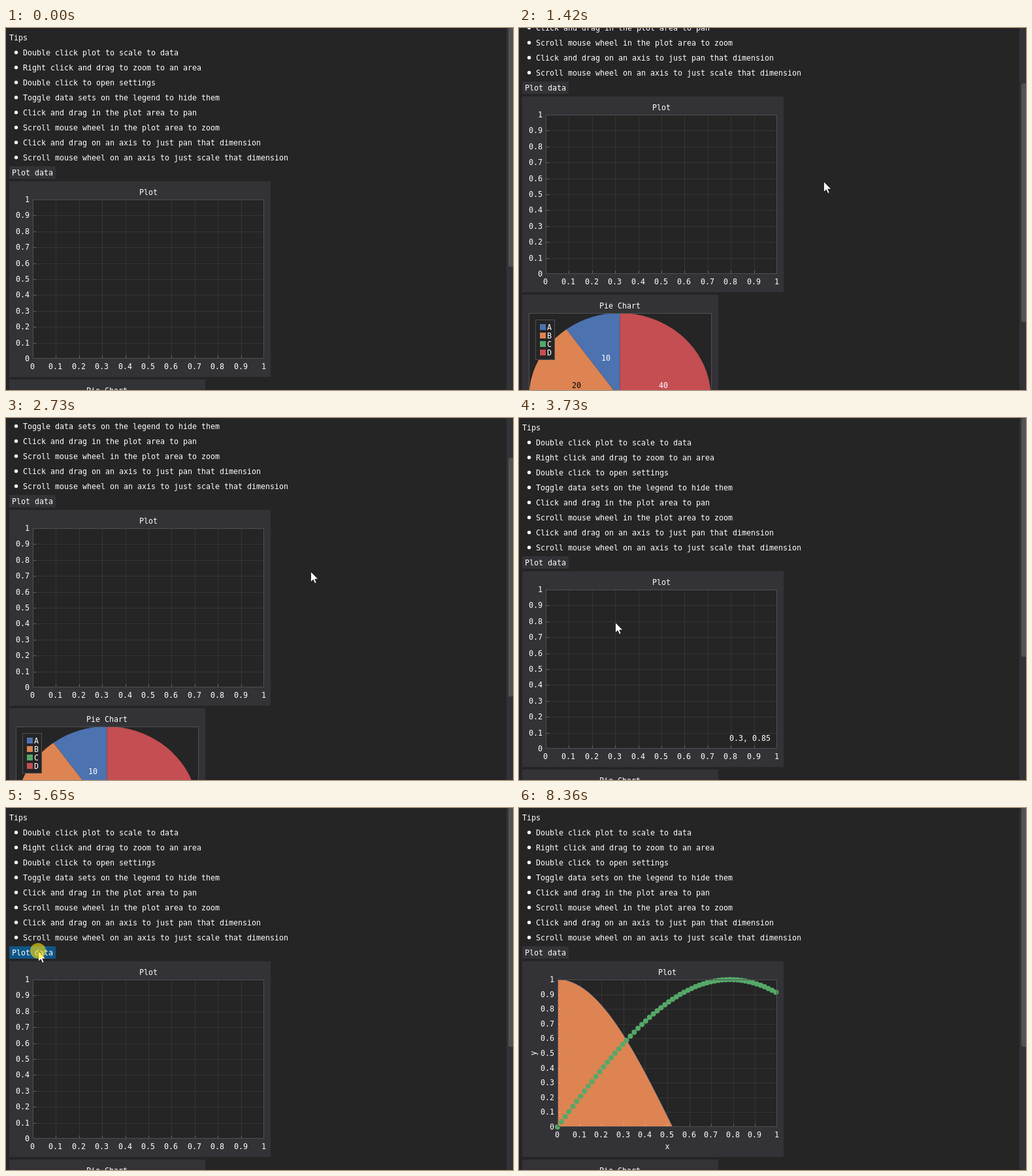
Recreate the animation shown at these times as an HTML page. Size 776x555 px, loop 9270 ms.

```html
<!DOCTYPE html>
<html lang="en">
<head>
<meta charset="utf-8">
<title>Plot demo</title>
<style>
  html, body { margin: 0; width: 100%; height: 100%; overflow: hidden; background: #252526; }
  svg { display: block; width: 776px; height: 555px; }
  text { font: 11.63px "DejaVu Sans Mono", monospace; fill: #fff; white-space: pre; }
  rect { shape-rendering: crispEdges; }
  .panel { fill: #333337; }
  .area { fill: #252526; }
  .grid { fill: #fff; fill-opacity: .065; }
  .tick { fill: #fff; fill-opacity: .25; }
  .frame { fill: none; stroke: #505052; }
  .grab { fill: #525255; shape-rendering: auto; }
</style>
</head>
<body>
<svg id="stage" viewBox="0 0 776 555"></svg>
<script>
const LOOP = 9270;
const BLUE = '#4c72b0', ORANGE = '#dd8452', GREEN = '#55a868', RED = '#c44e52';
const stage = document.getElementById('stage');

function add(parent, tag, attrs) {
  const el = document.createElementNS('http://www.w3.org/2000/svg', tag);
  for (const k in attrs) el.setAttribute(k, attrs[k]);
  return parent.appendChild(el);
}
const box = (p, x, y, width, height, cls) => add(p, 'rect', { x, y, width, height, class: cls });
function label(p, str, x, mid, anchor = 'start', fill) {
  const el = add(p, 'text', { x, y: mid + 4, 'text-anchor': anchor });
  if (fill) el.style.fill = fill;
  el.textContent = str;
  return el;
}
// One pixel wide border just inside the given box
const frame = (p, x, y, w, h) => box(p, x + .5, y + .5, w - 1, h - 1, 'frame');

// Page content
const page = add(stage, 'g', {});
label(page, 'Tips', 5, 15);
[
  'Double click plot to scale to data',
  'Right click and drag to zoom to an area',
  'Double click to open settings',
  'Toggle data sets on the legend to hide them',
  'Click and drag in the plot area to pan',
  'Scroll mouse wheel in the plot area to zoom',
  'Click and drag on an axis to just pan that dimension',
  'Scroll mouse wheel on an axis to just scale that dimension'
].forEach((tip, i) => {
  const y = 38 + 23 * i;
  add(page, 'circle', { cx: 15.5, cy: y - .5, r: 2.7, fill: '#fff' });
  label(page, tip, 26, y);
});
const button = box(page, 5, 212, 71, 19, 'panel');
label(page, 'Plot data', 9, 222);
box(page, 5, 235, 400, 300, 'panel');

function makePlot({ x, y, w, h }, drawData) {
  const g = add(page, 'g', {});
  box(g, x, y, w, h, 'area');
  label(g, 'Plot', x + w / 2, 252, 'middle');
  const at = i => [Math.round(x + w * i / 10), Math.round(y + h - h * i / 10)];
  for (let i = 0; i <= 10; i++) {
    const [tx, ty] = at(i);
    if (i % 10) {
      box(g, tx, y, 1, h, 'grid');
      box(g, x, ty, w, 1, 'grid');
    }
    label(g, i / 10, tx - .5, y + h + 12, 'middle');
    label(g, i / 10, x - 5, ty, 'end');
  }
  if (drawData) drawData(g);
  for (let i = 1; i < 10; i++) {
    const [tx, ty] = at(i);
    box(g, tx, y + h - 5, 1, 5, 'tick');
    box(g, x, ty, 5, 1, 'tick');
  }
  frame(g, x, y, w, h);
  return g;
}

const emptyArea = { x: 41, y: 263, w: 354, h: 244 };
const dataArea = { x: 59, y: 263, w: 336, h: 226 };
const emptyPlot = makePlot(emptyArea);
const dataPlot = makePlot(dataArea, g => {
  const { x, y, w, h } = dataArea;
  const px = v => x + v * w, py = v => y + (1 - v) * h;
  const end = Math.PI / 6;
  let d = '';
  for (let i = 0; i <= 30; i++) {
    const v = end * i / 30;
    d += (i ? 'L' : 'M') + px(v).toFixed(2) + ' ' + py(Math.cos(3 * v)).toFixed(2);
  }
  add(g, 'path', { d, fill: 'none', stroke: BLUE });
  add(g, 'path', { d: d + `H${px(0)}Z`, fill: ORANGE });
  for (let i = 0; i < 58; i++) {
    const v = i * Math.PI / 180;
    add(g, 'circle', { cx: px(v), cy: py(Math.sin(2 * v)), r: 4, fill: GREEN });
  }
  label(g, 'x', 227, 519, 'middle');
  label(g, 'y', 0, 0, 'middle').setAttribute('transform', 'translate(22 376) rotate(-90)');
});
const coords = label(page, '', 385, 491, 'end');

// Pie chart
box(page, 5, 539, 300, 300, 'panel');
label(page, 'Pie Chart', 154.5, 556, 'middle');
box(page, 15, 567, 280, 262, 'area');
const slices = [['A', 10, BLUE, '#fff'], ['B', 20, ORANGE, '#000'], ['C', 30, GREEN, '#000'], ['D', 40, RED, '#fff']];
const onPie = (part, r) => {
  const a = part / 100 * 2 * Math.PI;
  return [154.5 - 139.5 * r * Math.sin(a), 698 - 131 * r * Math.cos(a)];
};
let sum = 0;
for (const [, value, fill, ink] of slices) {
  const d = `M154.5 698L${onPie(sum, 1)}A139.5 131 0 0 0 ${onPie(sum + value, 1)}Z`;
  add(page, 'path', { d, fill });
  const [lx, ly] = onPie(sum + value / 2, .5);
  label(page, value, Math.round(lx), Math.round(ly), 'middle', ink);
  sum += value;
}
frame(page, 15, 567, 280, 262);
box(page, 25, 577, 30, 62, 'area');
frame(page, 25, 577, 30, 62);
slices.forEach(([name, , fill], i) => {
  const y = 589 + 13 * i;
  add(page, 'rect', { x: 32, y: y - 5, width: 9, height: 9, fill });
  label(page, name, 43, y);
});

// Scrollbar, pointer and click mark
box(stage, 766, 0, 10, 555, 'panel');
const grab = add(stage, 'rect', { x: 769, y: 0, width: 14, height: 366, rx: 3, class: 'grab' });
const pointer = add(stage, 'path', {
  d: 'M.5 .5V16.5L4.2 13 6.7 18.6 9.2 17.5 6.8 12.1H11.8Z',
  fill: '#fff', stroke: '#111', 'stroke-width': .8
});
const click = add(stage, 'circle', { cx: 49, cy: 219, r: 12, fill: 'rgba(255,225,10,.6)' });

// Timeline
const scrolls = [[0, 0], [1420, 130], [1720, 195], [1820, 289], [2630, 224], [2730, 94], [3030, 0]];
const moves = [];
const easeOut = u => 1 - (1 - u) ** 2;
const smooth = u => u * u * (3 - 2 * u);
const linear = u => u;

function glide(t, step, n, from, bend, to, ease, first = 1) {
  for (let i = 0; i < n; i++) {
    const u = ease((i + first) / (n - 1 + first)), v = 1 - u;
    const at = k => Math.round(v * v * from[k] + 2 * u * v * bend[k] + u * u * to[k]);
    moves.push([t + step * i, at(0), at(1)]);
  }
}
glide(200, 920 / 9, 10, [673, 474], [560, 330], [466, 235], easeOut, 0);
[[450, 236], [350, 243], [215, 270], [147, 300], [147, 313], [145, 324], [147, 333], [152, 340], [158, 344], [162, 346]]
  .forEach(([x, y], i) => moves.push([3330 + 100 * i, x, y]));
glide(4350, 100, 7, [162, 346], [90, 260], [47, 209], easeOut);
glide(5150, 100, 3, [47, 209], [48, 214], [49, 219], linear);
glide(6860, 100, 10, [49, 219], [340, 340], [646, 475], smooth);
glide(7860, 100, 5, [646, 475], [690, 510], [728, 551], linear);

const show = (el, on) => { el.style.display = on ? '' : 'none'; };
const lastAt = (list, t) => list.findLastIndex(e => e[0] <= t);

function render(t) {
  const scroll = scrolls[lastAt(scrolls, t)][1];
  page.setAttribute('transform', `translate(0 ${-scroll})`);
  grab.setAttribute('y', Math.round(scroll * 189 / 289));

  const i = t < 8360 ? lastAt(moves, t) : -1;
  const [, x, y] = moves[i] || [0, -50, -50];
  show(pointer, i >= 0);
  pointer.setAttribute('transform', `translate(${x} ${y})`);

  const pressed = t >= 5650 && t < 5750;
  const hover = !scroll && x >= 5 && x < 76 && y >= 212 && y < 231;
  button.style.fill = pressed ? '#0f5687' : hover ? '#225376' : '';
  show(click, pressed);

  const plotted = t >= 5750;
  show(emptyPlot, !plotted);
  show(dataPlot, plotted);

  // The readout trails the pointer by one step.
  const area = plotted ? dataArea : emptyArea;
  const [, mx, my] = moves[i - 1] || [0, -50, -50];
  const u = (mx - area.x) / area.w, v = 1 - (my - area.y) / area.h;
  const inside = !scroll && u >= 0 && u <= 1 && v >= 0 && v <= 1;
  show(coords, inside);
  if (inside) {
    coords.textContent = `${+u.toFixed(2)}, ${+v.toFixed(2)}`;
    coords.setAttribute('y', area.y + area.h - 12);
  }
}

const start = performance.now();
function tick() {
  render((performance.now() - start) % LOOP);
  requestAnimationFrame(tick);
}
tick();
</script>
</body>
</html>
```
